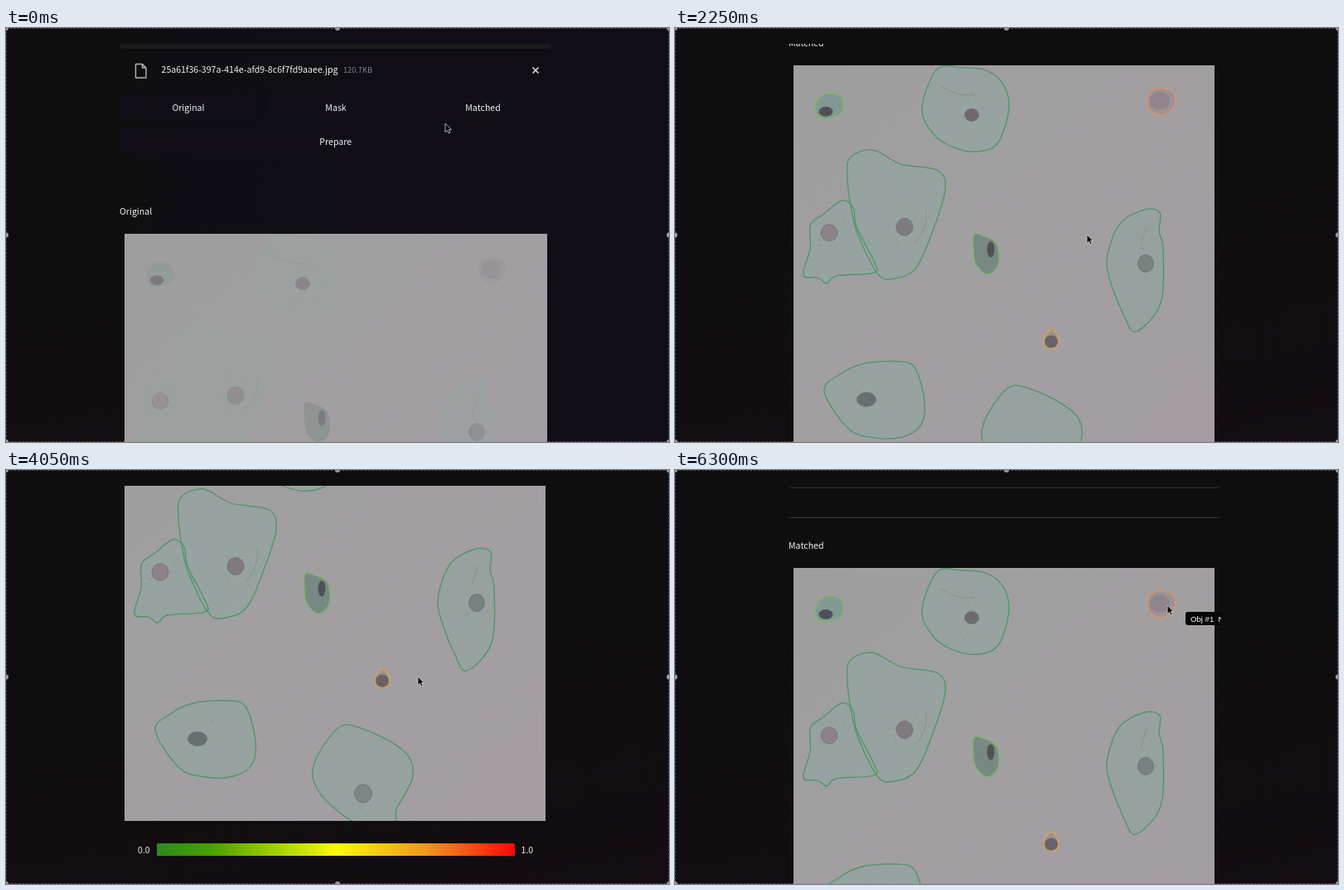
Recreate the animation shown at these times as an HTML page. Size 800 by 499 pixels, loop 6.35 s.

```html
<!DOCTYPE html>
<html lang="en">
<head>
<meta charset="utf-8">
<title>Cell matching viewer</title>
<style>
  html, body { margin: 0; width: 100%; height: 100%; overflow: hidden; background: #0e0e0e; }
  svg { display: block; width: 800px; height: 499px; }
  text { font: 10.6px "Noto Sans CJK JP", "Noto Sans CJK SC", "Noto Sans CJK", Lato, sans-serif; fill: #f2f2f2; }
  .mid { text-anchor: middle; }
  .size { font-size: 9.2px; fill: #86868a; }
  .tip { font: 9.6px "Liberation Sans", Arial, sans-serif; fill: #fff; white-space: pre; }
  .btn { fill: #110e17; stroke: #37332f; }
</style>
</head>
<body>
<svg viewBox="0 0 800 499">
  <defs>
    <linearGradient id="tint">
      <stop offset="0.18" stop-color="#0f0d15" stop-opacity="0"/>
      <stop offset="0.24" stop-color="#0f0d14"/>
      <stop offset="1" stop-color="#120d17"/>
    </linearGradient>
    <linearGradient id="corner" x1="0.75" y1="0.2" x2="1" y2="1">
      <stop offset="0" stop-color="#130c10" stop-opacity="0"/>
      <stop offset="1" stop-color="#130c11"/>
    </linearGradient>
    <linearGradient id="slide" x1="0" y1="0" x2="1" y2="1">
      <stop offset="0" stop-color="#9f9e9f"/>
      <stop offset="0.4" stop-color="#a19fa1"/>
      <stop offset="1" stop-color="#a59da4"/>
    </linearGradient>
    <linearGradient id="scale">
      <stop offset="0" stop-color="#2b8a20"/>
      <stop offset="0.15" stop-color="#46a000"/>
      <stop offset="0.5" stop-color="#f8fa0c"/>
      <stop offset="0.75" stop-color="#f0981e"/>
      <stop offset="1" stop-color="#f60808"/>
    </linearGradient>
    <clipPath id="page"><rect y="19" width="800" height="480"/></clipPath>
    <clipPath id="photo"><rect id="photoClip" x="143" width="508" height="502"/></clipPath>
    <clipPath id="panel"><rect width="659" height="499"/></clipPath>
  </defs>

  <rect width="800" height="499" fill="#0e0e0e"/>
  <rect width="800" height="499" fill="url(#corner)"/>
  <rect id="wash" width="800" height="499" fill="url(#tint)"/>

  <g clip-path="url(#page)">
    <g id="content">
      <rect x="137" y="8" width="521" height="17" rx="4" fill="#1a1a1d"/>
      <path d="M156.500 43.500h8l4.500 4.500v12h-12.500zM164.500 43.500v4.500h4.500" fill="none" stroke="#b4b4b8" stroke-width="1.400" stroke-linejoin="round"/>
      <text x="187.500" y="54">25a61f36-397a-414e-afd9-8c6f7fd9aaee.jpg</text>
      <text class="size" x="407" y="54">120.7KB</text>
      <path d="M635.500 47.500l7 7m0-7l-7 7" stroke="#eee" stroke-width="1.400"/>
      <g id="buttons"></g>
      <path id="divider" d="M137 187.500H658" stroke="#39373c"/>
      <text id="mode" x="137" y="225">Original</text>
      <g transform="translate(0 248)">
        <g clip-path="url(#photo)">
          <rect id="slideRect" x="143" width="508" height="502" fill="url(#slide)"/>
          <g id="cells"></g>
          <g id="outlines" fill="none" stroke-width="1.300"></g>
        </g>
        <rect x="182" y="529" width="432" height="15" rx="1.500" fill="url(#scale)"/>
        <text x="159" y="540.500">0.0</text>
        <text x="621.500" y="540.500">1.0</text>
      </g>
    </g>
  </g>

  <g id="tip" clip-path="url(#panel)">
    <g id="tipBox">
      <rect width="60" height="16" rx="3" fill="#050505"/>
      <text class="tip" x="6" y="11.500">Obj #1  N</text>
    </g>
  </g>
  <path id="cursor" d="M0 0V10.500L2.500 8.300L4.200 12L6 11.200L4.400 7.600H7.600Z" fill="#050505" stroke="#d8d8d8" stroke-width="0.800"/>

  <rect x="0.500" y="0.500" width="799" height="498" fill="none" stroke="#9a9a9a" stroke-opacity="0.450" stroke-dasharray="2.500 2"/>
  <g id="handles" fill="#9c9c9c"></g>
</svg>

<script>
const LOOP = 6350, SWITCH = 750;
const $ = id => document.getElementById(id);

function add(parent, tag, attrs, text) {
  const node = document.createElementNS("http://www.w3.org/2000/svg", tag);
  for (const key in attrs) node.setAttribute(key, attrs[key]);
  if (text) node.textContent = text;
  return parent.appendChild(node);
}

// Closed Catmull-Rom curve through "x,y x,y ..."
function blob(points) {
  const p = points.split(" ").map(s => s.split(",").map(Number));
  const at = i => p[(i + p.length) % p.length];
  let d = "M" + p[0];
  p.forEach((_, i) => {
    const [a, b, c, e] = [at(i - 1), at(i), at(i + 1), at(i + 2)];
    const c1 = b.map((v, k) => v + (c[k] - a[k]) / 6);
    const c2 = c.map((v, k) => v - (e[k] - b[k]) / 6);
    d += `C${c1} ${c2} ${c}`;
  });
  return d + "Z";
}

const GREEN = "#4c9467", LIME = "#79b85c", ORANGE = "#e5925a";
const cells = [
  { shape: "316,5 345,3 375,6 396,23 403,52 390,93 366,104 336,99 312,83 298,52", nucleus: [358, 60, 8.500, 7.500], tone: "#6f6a72" },
  { shape: "163,207 164,191 180,179 201,163 215,172 219,195 240,236 240,250 195,254 183,263 172,256 155,253 163,222", nucleus: [186, 202, 10, 10], tone: "#8b8388" },
  { shape: "208,137 211,112 238,102 272,119 317,127 326,150 312,197 291,244 265,257 245,252 221,205 213,175", nucleus: [277, 195, 10, 10.500], tone: "#807a80" },
  { shape: "585,178 567,174 537,191 522,228 524,256 541,300 556,321 586,287 589,222 584,200", nucleus: [568, 239, 9.500, 10.500], tone: "#78817f" },
  { shape: "361,204 373,206 388,215 390,240 377,252 363,240 360,222", nucleus: [381, 222, 4.500, 9.500], tone: "#4c5256", fill: "#74867f", line: LIME },
  { shape: "170,46 180,35 196,36 203,46 199,59 183,64 171,60", nucleus: [182, 56, 8.500, 6], tone: "#50505a", fill: "#7f9992", line: LIME },
  { shape: "572,34 586,28 601,33 602,50 588,60 572,53", nucleus: [585, 43, 12, 11], tone: "#8f858b", fill: "#9b9297", line: ORANGE },
  { shape: "455,318 462,328 462,338 454,342 446,338 446,327", nucleus: [454, 333, 8, 7.500], tone: "#6a6266", fill: "#99928f", line: "#e0a052" },
  { shape: "180,393 200,372 226,360 265,357 289,364 301,405 297,433 275,448 240,449 209,438", nucleus: [231, 403, 11.500, 8.500], tone: "#67706f" },
  { shape: "402,389 425,389 465,407 487,426 490,452 471,488 468,510 425,506 384,475 370,448 377,421", nucleus: [431, 469, 10.500, 11], tone: "#7f8585" }
];

let seed = 7;
const random = () => (seed = seed * 16807 % 2147483647) / 2147483647;

cells.forEach(({ shape, nucleus: [cx, cy, rx, ry], tone, fill, line }) => {
  const d = blob(shape);
  add($("cells"), "path", { d, fill: fill || "#96a4a0", "fill-opacity": fill ? 0.9 : 0.85 });
  if (!fill) for (let i = 0; i < 12; i++) {
    const angle = random() * 2 * Math.PI, r = 14 + random() * 20;
    add($("cells"), "circle", { cx: cx + r * Math.cos(angle) * 0.7, cy: cy + r * Math.sin(angle), r: 0.7, fill: "#7f8f8a" });
  }
  add($("cells"), "ellipse", { cx, cy, rx, ry, fill: tone, stroke: "#626d6d", "stroke-width": 1, "stroke-opacity": fill ? 0 : 0.7 });
  add($("outlines"), "path", { d, stroke: line || GREEN });
});
add($("cells"), "path", { d: "M303 174Q306 194 290 214M569 194L562 218M320 25Q340 38 362 36", fill: "none", stroke: "#80928c" });

const frames = [];
[["Original", 137.5, 81.5, 165], ["Mask", 315.5, 81.5, 165], ["Matched", 493, 81.5, 165], ["Prepare", 137.5, 122.5, 520.5]]
  .forEach(([name, x, y, width]) => {
    frames.push(add($("buttons"), "rect", { class: "btn", x, y, width, height: 29, rx: 4 }));
    add($("buttons"), "text", { class: "mid", x: x + width / 2, y: y + 18.3 }, name);
  });

for (const x of [0, 400, 800]) for (const y of [0, 249.5, 499])
  if (x !== 400 || y !== 249.5) add($("handles"), "circle", { cx: x, cy: y, r: 3 });

// Keys are [time, value, value...]; eased between neighbours
const smooth = k => k * k * (3 - 2 * k);
const linear = k => k;
function track(keys, t, ease = smooth) {
  const i = keys.findIndex(key => key[0] > t);
  if (i < 0) return keys[keys.length - 1].slice(1);
  if (i === 0) return keys[0].slice(1);
  const [a, b] = [keys[i - 1], keys[i]];
  const k = ease((t - a[0]) / (b[0] - a[0]));
  return a.slice(1).map((v, n) => v + (b[n + 1] - v) * k);
}

const scrollKeys = [[1400, 0], [1600, 30], [2000, 158], [2250, 203], [2550, 255], [2700, 258], [2950, 313],
  [3350, 313], [3600, 327], [4100, 327], [4300, 290], [4650, 165], [4850, 130]];
const cursorKeys = [[0, 530, 115], [350, 566, 97], [800, 566, 97], [1300, 497, 249], [4600, 497, 249],
  [5000, 573, 170], [5300, 573, 170], [5600, 590, 160], [5900, 594, 163]];

function render(t) {
  const [scroll] = track(scrollKeys, t, linear);
  const [x, y] = track(cursorKeys, t);
  const matched = t >= SWITCH;
  const reveal = Math.min(1, t / 400);

  $("content").setAttribute("transform", `translate(0 ${-scroll})`);
  $("cursor").setAttribute("transform", `translate(${x} ${y})`);
  $("tipBox").setAttribute("transform", `translate(${x + 22} ${y + 8})`);
  $("tip").style.display = t >= 5350 ? "" : "none";

  $("mode").textContent = matched ? "Matched" : "Original";
  $("outlines").style.display = matched ? "" : "none";
  $("cells").style.opacity = 0.45 + 0.55 * reveal;
  for (const id of ["photoClip", "slideRect"]) $(id).setAttribute("width", matched ? 508 : 510);

  frames.forEach(f => f.style.strokeOpacity = reveal);
  $("divider").style.opacity = reveal;
  $("wash").style.opacity = t < 2000 ? 1 : 0;
}

const start = performance.now();
function tick() {
  render((performance.now() - start) % LOOP);
  requestAnimationFrame(tick);
}
tick();
</script>
</body>
</html>
```
